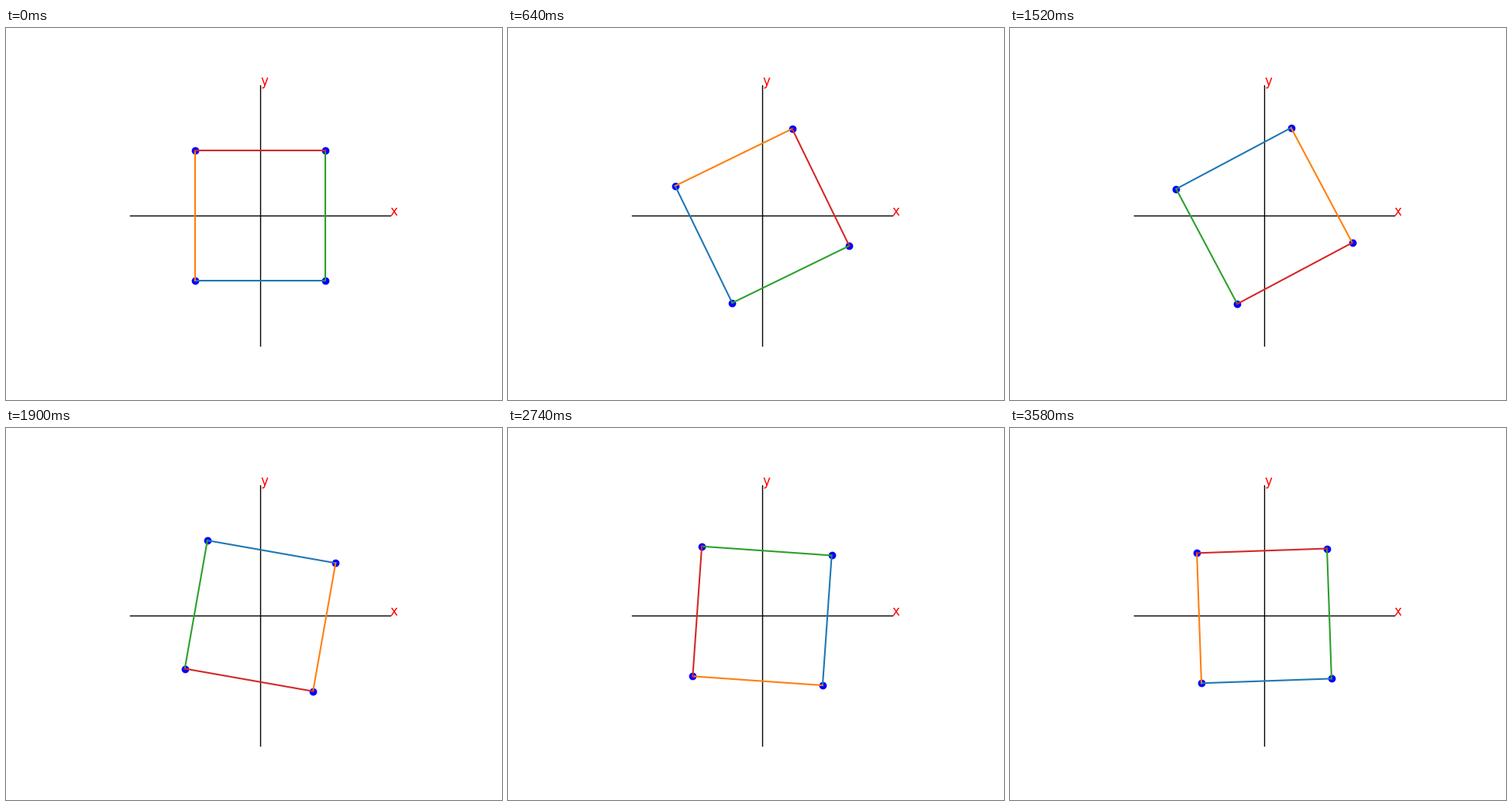
Recreate the animation shown at these times as a matplotlib script. Size 640 by 480 pixels, loop 3600 ms.

```python
import numpy as np
import matplotlib.pyplot as plt
from matplotlib.animation import FuncAnimation

FRAMES = 180
STEP = np.radians(-360 / FRAMES)  # clockwise turn per frame

fig, ax = plt.subplots(figsize=(6.4, 4.8), dpi=100)
ax.set_aspect("equal")
ax.axis("off")

# Coordinate axes
ax.plot([-2, 2], [0, 0], color="black", lw=1)
ax.plot([0, 0], [-2, 2], color="black", lw=1)
ax.set_xlim(-2.2, 2.2)
ax.set_ylim(-2.2, 2.2)
for x, y, label in [(2, 0, "x"), (0, 2, "y")]:
    ax.text(x, y, label, color="red", fontsize=12)

# Corners run counterclockwise from the lower left
corners = np.array([[-1, 1, 1, -1], [-1, -1, 1, 1]])
dots, = ax.plot([], [], "o", color="blue")

# Each side: colour, start corner, end corner
sides = [("tab:blue", 0, 1), ("tab:orange", 0, 3),
         ("tab:green", 1, 2), ("tab:red", 2, 3)]
lines = [ax.plot([], [], color=color, lw=1.5)[0] for color, _, _ in sides]


def update(i):
    c, s = np.cos(i * STEP), np.sin(i * STEP)
    points = np.array([[c, -s], [s, c]]) @ corners
    dots.set_data(*points)
    for line, (_, a, b) in zip(lines, sides):
        line.set_data(*points[:, [a, b]])
    return [dots, *lines]


anim = FuncAnimation(fig, update, frames=FRAMES, interval=20,
                     repeat=True, repeat_delay=0)
plt.show()
```
